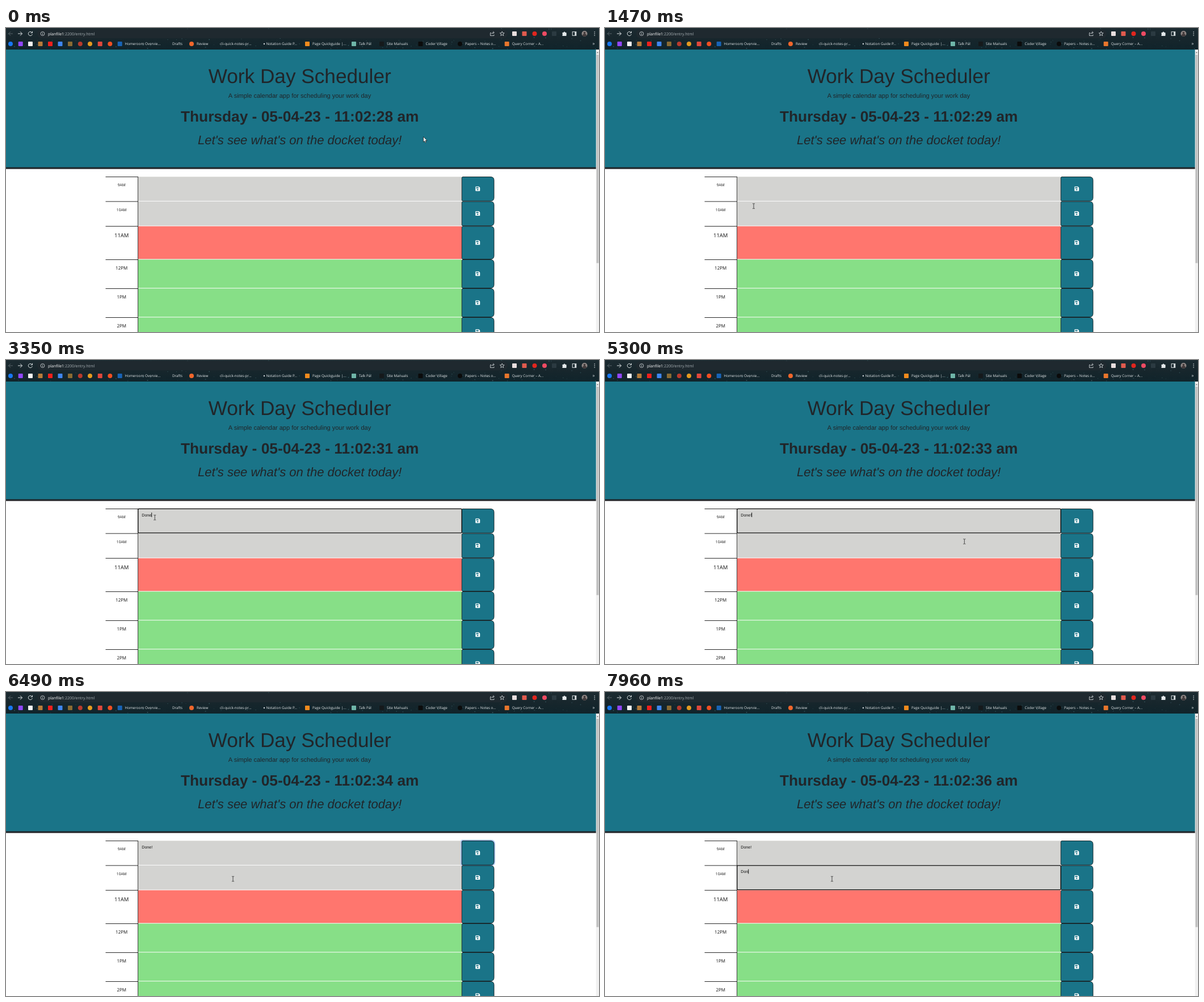
These frames come from a looping animation (1045x536 px, 8 s). An HTML page:

```html
<!DOCTYPE html>
<html lang="en">
<head>
<meta charset="utf-8">
<title>Work Day Scheduler</title>
<style>
  html, body { margin: 0; width: 100%; height: 100%; overflow: hidden; background: #fff; }
  svg { display: block; width: 100%; height: 100%; }
  text { text-rendering: geometricPrecision; white-space: pre; }
  .page { font-family: "Liberation Sans", Arial, sans-serif; fill: #212529; }
  .mid { text-anchor: middle; }
  .ui { font-family: "Open Sans", "Noto Sans", sans-serif; fill: #e4e8ea; }
  .label { font-family: "Open Sans", "Noto Sans", sans-serif; fill: #111; }
  .note { font: 7.1px "Liberation Sans", Arial, sans-serif; fill: #111; }
  .line { fill: none; stroke: #dfe4e6; stroke-width: 1; }
</style>
</head>
<body>
<svg id="stage" viewBox="0 0 1045 536">
  <defs>
    <linearGradient id="sky" x2="0" y2="1">
      <stop offset="0" stop-color="#1c2b31"/>
      <stop offset=".5" stop-color="#17262c"/>
      <stop offset="1" stop-color="#10242b"/>
    </linearGradient>
  </defs>

  <rect width="1045" height="38" fill="url(#sky)"/>
  <g id="specks"></g>
  <rect x="55" y="2" width="829" height="16" rx="8" fill="#1f292f"/>
  <g class="line">
    <path d="M12 10H4.500M8 6.500L4.500 10L8 13.500" stroke="#59656b"/>
    <path d="M21 10H28.500M25 6.500L28.500 10L25 13.500"/>
    <path d="M45.600 7.600A3.600 3.600 0 1 0 46.400 11M46.500 5.800V8.700H43.600"/>
    <circle cx="64.500" cy="10" r="3.400" stroke-width=".8"/>
    <path d="M64.500 9.500V12M64.500 7.800V8.600" stroke-width=".8"/>
    <path d="M855 8.500H853.500V13.500H860V11.500M855.500 11Q856 8 860 8M858.200 6L860.400 8L858.200 10" stroke-width=".8"/>
    <path d="M874.300 6L875.400 8.700L878.200 8.900L876 10.700L876.800 13.500L874.300 12L871.800 13.500L872.600 10.700L870.400 8.900L873.200 8.700Z" stroke-width=".8"/>
    <rect x="998.200" y="6.700" width="6.600" height="6.600"/>
    <path d="M1003.500 7V13" stroke-width="2.400"/>
  </g>
  <path d="M980.500 8H982.500A1.500 1.500 0 0 1 985.500 8H987.500V10A1.500 1.500 0 0 1 987.500 12V14H980.500V12A1.500 1.500 0 0 0 980.500 10Z" fill="#e4e8ea"/>
  <g fill="#e4e8ea"><circle cx="1037.200" cy="7" r=".8"/><circle cx="1037.200" cy="10" r=".8"/><circle cx="1037.200" cy="13" r=".8"/></g>
  <circle cx="1019.500" cy="10" r="5" fill="#8d8583"/>
  <path d="M1016 13.400Q1016 10.300 1019.500 10.300T1023 13.400Q1019.500 16 1016 13.400Z" fill="#403839"/>
  <circle cx="1019.500" cy="8.600" r="1.900" fill="#403839"/>
  <text class="ui" x="74" y="12.600" font-size="7"><tspan fill="#fff">planfile1</tspan><tspan fill="#a9b1b5">:2200/entry.html</tspan></text>
  <g id="bookmarks"></g>
  <text class="ui" x="1033.500" y="30" font-size="8">»</text>

  <rect y="38" width="1040" height="208" fill="#1a7488"/>
  <rect y="245.500" width="1040" height="3.100" fill="#212529"/>
  <g class="page mid">
    <text x="517.700" y="97" font-size="35.200">Work Day Scheduler</text>
    <text x="517.500" y="122.800" font-size="11">A simple calendar app for scheduling your work day</text>
    <text id="clock" x="517.700" y="164.600" font-size="26.300" font-weight="bold"></text>
    <text x="517.700" y="205.300" font-size="22" font-style="italic">Let's see what's on the docket today!</text>
  </g>

  <rect x="1039.700" y="38" width="5.300" height="498" fill="#f1f1f1"/>
  <rect x="1040.500" y="47" width="4" height="367.500" fill="#c1c1c1"/>
  <path d="M1040.800 44.300L1042.500 42L1044.200 44.300Z" fill="#777"/>

  <g id="rows"></g>
  <g id="focus"></g>
  <rect id="caret" width=".9" height="8" fill="#000"/>
  <circle id="click" r="6" fill="#e3dc1e" fill-opacity=".8"/>
  <g id="cursor">
    <path id="arrow" d="M0 0V9.300L2.100 7.400L3.500 10.500L5 9.800L3.600 6.800H6.500Z" fill="#fff" stroke="#111" stroke-width=".7"/>
    <path id="beam" d="M-2 -4.300H-.6L0 -3.800L.6 -4.300H2M0 -3.800V3.800M-2 4.300H-.6L0 3.800L.6 4.300H2" fill="none" stroke-width=".8"/>
    <path id="hand" d="M-.9 .6Q0 -.6 .9 .6V4L4.300 4.700Q5.500 5 5.300 6.500L4.500 11.500H-.4L-2.800 7.700Q-3 6.200 -1.600 6.500L-.9 7.200Z" fill="#fff" stroke="#111" stroke-width=".7"/>
  </g>
</svg>

<script>
const LOOP = 8000;
const NS = "http://www.w3.org/2000/svg";
const $ = id => document.getElementById(id);

function add(parent, tag, attrs, content) {
  const node = document.createElementNS(NS, tag);
  for (const key in attrs) node.setAttribute(key, attrs[key]);
  if (content) node.textContent = content;
  parent.appendChild(node);
  return node;
}
const show = (node, on) => node.setAttribute("visibility", on ? "visible" : "hidden");

// Faint stars behind the browser bars
let seed = 7;
const random = () => (seed = seed * 16807 % 2147483647) / 2147483647;
for (let i = 0; i < 190; i++) {
  const y = random() < .75 ? 19 + random() * 18 : random() * 19;
  add($("specks"), "circle", {
    cx: random() * 1045, cy: y, r: .3 + random() * .7,
    fill: "#5c8f98", "fill-opacity": .12 + random() * .4
  });
}

// Browser icons: x, colour, round
function icon(x, y, color, round, size = 8) {
  if (round) add($("bookmarks"), "circle", { cx: x, cy: y, r: size / 2, fill: color });
  else add($("bookmarks"), "rect", { x: x - size / 2, y: y - size / 2, width: size, height: size, rx: 1, fill: color });
}
[[8, "#1877f2", 1], [25.7, "#9147ff"], [43, "#f4f4f4"], [60.500, "#b77b3a"], [78, "#f0201c"],
 [95.500, "#3f86f0"], [113, "#8a6a32"], [130.800, "#b83a2c", 1], [148, "#e59a20", 1],
 [165.700, "#e0483c"], [183.300, "#f04f22", 1], [200.700, "#1763b5"]]
  .forEach(([x, color, round]) => icon(x, 28, color, round));
[[896, "#e8dede"], [913.500, "#e05a4e"], [931.500, "#e0261f", 1], [949, "#ef4b63", 1], [966, "#2b3a41"]]
  .forEach(([x, color, round]) => icon(x, 10, color, round));

[[209.500, "Homeroom Overvie..."],
 [293, "Drafts"],
 [336, "Review", "#f0662b", 1],
 [377, "cli-quick-notes-pr..."],
 [458.500, "Notation Guide P...", "#cfd6d9", 1, 2.500],
 [540, "Page Quickguide |...", "#f08a1d"],
 [622, "Talk Pal", "#6fb5a8"],
 [671, "Site Manuals", "#15191b"],
 [739.500, "Coder Village", "#0b0b0b"],
 [809, "Papers – Notes o...", "#0b0b0b", 1],
 [891.700, "Query Corner – A...", "#e8762c"]]
  .forEach(([x, name, color, round, size]) => {
    if (color) icon(x - (size ? 3.500 : 9), 28, color, round, size);
    add($("bookmarks"), "text", { class: "ui", x, y: 30.200, "font-size": 6.300 }, name);
  });

// Time blocks
const GRAY = "#d3d3d1", RED = "#ff766e", GREEN = "#87df87";
const rows = [
  { label: "9AM", y: 262, h: 43.500, size: 6.600, color: GRAY },
  { label: "10AM", y: 305.500, h: 43.700, size: 6.600, color: GRAY },
  { label: "11AM", y: 349.200, h: 58.800, size: 9.500, color: RED },
  { label: "12PM", y: 408, h: 51, size: 8, color: GREEN },
  { label: "1PM", y: 459, h: 51, size: 8, color: GREEN },
  { label: "2PM", y: 510, h: 51, size: 8, color: GREEN }
];
const buttonPath = (y, h) =>
  `M805 ${y}H854Q860 ${y} 860 ${y + 6}V${y + h - 6}Q860 ${y + h} 854 ${y + h}H805Q803.300 ${y + h} 803.300 ${y + h - 2}V${y + 2}Q803.300 ${y} 805 ${y}Z`;

// Painted from the bottom up, so a button's focus glow stays under the next row
const glow = add($("rows"), "path", {
  d: buttonPath(262.500, 42.500), fill: "none", stroke: "#9fc3f7", "stroke-width": 4.500, "stroke-opacity": .8
});
rows.forEach((row, i) => {
  const g = $("rows"), { y, h, size } = row;
  add(g, "rect", { x: 175.500, y, width: 57.500, height: .9, fill: "#111" });
  add(g, "rect", { x: 232.200, y, width: .9, height: h, fill: "#111" });
  add(g, "rect", { x: 233, y: y + .3, width: 570, height: h - 1, fill: row.color });
  add(g, "text", { class: "label mid", x: 203.700, y: y + 13 + size * .68, "font-size": size }, row.label);
  if (i === 0) g.appendChild(glow);
  add(g, "path", { d: buttonPath(y + .5, h - 1), fill: "#1a7488", stroke: "#0c1a1e", "stroke-width": .9 });
  row.disk = add(g, "path", {
    transform: `translate(827.300 ${y + h / 2 - 4.300})`, "fill-rule": "evenodd",
    d: "M.9 0H6L8 2V7.100Q8 8 7.100 8H.9Q0 8 0 7.100V.9Q0 0 .9 0ZM1.200 1.200V3.200H5.500V1.200ZM4 4.300A1.200 1.200 0 1 0 4 6.700A1.200 1.200 0 1 0 4 4.300Z"
  });
  row.note = add(g, "text", { class: "note", x: 239.300, y: y + 13.600 });
  row.outline = add($("focus"), "rect", {
    x: 232.700, y: y + .4, width: 570.600, height: h - 1, rx: 1.500,
    fill: "none", stroke: "#050505", "stroke-width": 1.300
  });
});

// Schedule
const TICKS = [840, 1820, 2820, 3820, 4880, 5860, 6890, 7960];
const SAVED = 5860;
const entries = [
  { row: rows[0], from: 1890, to: SAVED, text: "Done!", keys: [2820, 2950, 3220, 3350, 3750] },
  { row: rows[1], from: 6820, to: LOOP, text: "Done!", keys: [7630, 7760, 7960] }
];
const clicks = [[1820, 1960], [5860, 6000], [6820, 6960]];
const advance = [0, .722, 1.278, 1.834, 2.390, 2.668];

// Pointer hot spot: time, x, y
const path = [
  [0, 735.500, 191.700], [280, 727, 188], [630, 681.500, 169.500], [840, 577, 177],
  [1050, 450, 218], [1260, 335, 280], [1470, 262, 314], [1610, 244, 300], [1750, 262, 277.700],
  [4740, 262.500, 277.700], [4950, 305, 296], [5160, 480, 324], [5370, 710, 318],
  [5580, 834, 291], [5720, 828, 283.500], [5930, 828, 283.500], [6070, 775, 296],
  [6280, 520, 324], [6420, 404, 329], [6490, 400, 329.500], [LOOP, 400, 329.500]
];

function pointerAt(t) {
  const base = t < 4810 ? 0 : 4810;
  const time = base + Math.floor((t - base) / 70) * 70;
  const i = path.findIndex(p => p[0] > time);
  const [t0, x0, y0] = path[i - 1], [t1, x1, y1] = path[i];
  const k = (time - t0) / (t1 - t0);
  return [x0 + (x1 - x0) * k, y0 + (y1 - y0) * k];
}

const inside = (x, y, l, t, r, b) => x > l && x < r && y > t && y < b;

function drawPointer(t) {
  const [x, y] = pointerAt(t);
  const onButton = inside(x, y, 803, 262, 860, 536);
  const onText = inside(x, y, 308, 140, 727, 171) || inside(x, y, 339, 184, 697, 211) ||
    inside(x, y, 233, 262, 803, 536);
  $("cursor").setAttribute("transform", `translate(${x} ${y})`);
  $("beam").setAttribute("stroke", y < 246 ? "#8cc0cb" : "#222");
  show($("hand"), onButton);
  show($("beam"), onText);
  show($("arrow"), !onButton && !onText);
  $("click").setAttribute("cx", x - .7);
  $("click").setAttribute("cy", y);
  show($("click"), clicks.some(([a, b]) => t >= a && t < b));
  rows.forEach(r => r.disk.setAttribute("fill",
    onButton && y >= r.y && y < r.y + r.h ? "#111" : "#fff"));
}

function drawEntries(t) {
  let caretOn = false;
  for (const { row, from, to, text, keys } of entries) {
    const typed = keys.filter(k => k <= t).length;
    const active = t >= from && t < to;
    row.note.textContent = text.slice(0, typed);
    if (!active) continue;
    const last = typed ? keys[typed - 1] : from;
    caretOn = Math.floor((t - last) / 530) % 2 === 0;
    $("caret").setAttribute("x", 239.300 + advance[typed] * 7.100);
    $("caret").setAttribute("y", row.y + 7);
  }
  rows.forEach(r => show(r.outline, entries.some(e => e.row === r && t >= e.from && t < e.to)));
  show($("caret"), caretOn);
  show(glow, t >= SAVED && t < 6820);
}

function frame() {
  const t = performance.now() % LOOP;
  $("clock").textContent = `Thursday - 05-04-23 - 11:02:${28 + TICKS.filter(k => k <= t).length} am`;
  drawEntries(t);
  drawPointer(t);
  requestAnimationFrame(frame);
}
frame();
</script>
</body>
</html>
```
